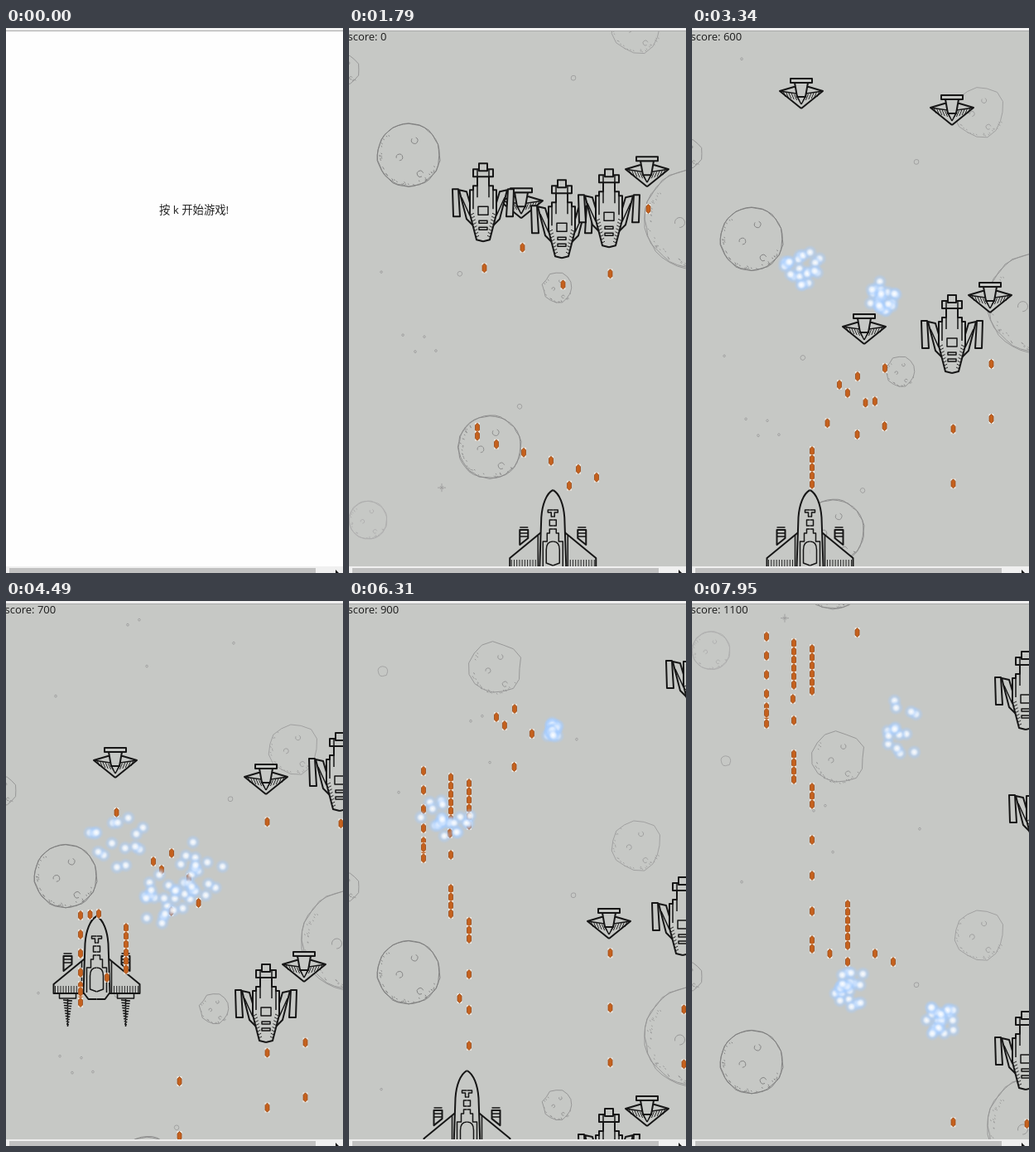
An HTML page with a canvas for the animation above (8 s loop, 407 px wide and 657 px high).

```html
<!DOCTYPE html>
<html lang="zh">
<head>
<meta charset="utf-8">
<style>
html, body { margin: 0; height: 100%; overflow: hidden; background: #fff; }
canvas { display: block; width: 407px; height: 657px; }
</style>
</head>
<body>
<canvas id="stage" width="407" height="657"></canvas>
<script>
const ctx = document.getElementById('stage').getContext('2d');
const LOOP = 8000, STEP = 140, SKY = '#c6c8c5', INK = '#161616';
const FONT = '"Open Sans", "Noto Sans CJK SC", "Noto Sans CJK", sans-serif';

// Game time is counted in units of one pixel of enemy movement.
const START = -79, CRASH = 630, END = 658;
const SHIP_SPEED = 3.3, BULLET_SPEED = 5 / 3, RELOAD = 10, ENEMY_RELOAD = 99, FIRST_SHOT = 95;

// [time in ms, game time]
const CLOCK = [[400, START], [1210, 0], [2490, 122], [3340, 206], [4490, 322], [6310, 496], [7950, END]];

// [game time, x and y the ship heads for]
const ORDERS = [[START, 155, 557], [-8, 178, 557], [-1, 299, 557], [39, 178, 557], [86, 254, 557],
  [122.5, 145, 557], [212, 90, 557], [252, 90, 391], [305.5, 112, 391], [313, 112, 380], [323, 123, 380],
  [379, 123, 444], [430, 145, 444], [459, 145, 568], [512.5, 188, 564], [529, 188, 464], [609, 243, 464]];

// Outlines hold the right half only and are mirrored; hatch: [x0, y0, x1, y1, dx, dy, count]
const SMALL = {
  halfWidth: 26, halfHeight: 18, reach: 31, muzzle: 26, lives: 1, points: 100,
  parts: ['M0 18L26-3L9-8H0', 'M0-13H8L5 4H0', 'M0-18H13V-13H0'],
  detail: 'M26-3L6 0M5 4L0 13',
  hatch: [22, -3, 5, 2, -3, 7, 6]
};
const BIG = {
  halfWidth: 38, halfHeight: 47, reach: 38, muzzle: 49, lives: 3, points: 300,
  parts: ['M29-15L20-13L12 14V28L20 20Z', 'M37-16H30L28 17H36Z',
    'M0-32H7V-20H12V-15H16V14L8 45L0 47', 'M0-40H12V-31H0', 'M0-47H5V-38H0'],
  detail: 'M0 5H6V15H0M0 22H5V25H0M0 30H5V33H0M12-15V8M7-20V-6M7-40V-31M26-6L16 16',
  hatch: [15, 15, 9, 42, -4, -2, 8]
};
const SHIP = {
  halfWidth: 52, parts: ['M40 66V48H30V58Z', 'M13 50L52 82V93H13Z', 'M0 0C8 4 13 18 14 33L16 92L10 100H0'],
  detail: 'M0 24H6V27H2V32H0M0 36H4V43H0M0 47H4V52H7V62H12V92M0 62Q8 62 8 72V88L0 91' +
    'M30 52H40M30 56H40M30 45H40M25 94V99H45V94M18 54V92',
  hatch: [21, 84, 50, 84, 0, 8, 10]
};

const ENEMIES = [[SMALL, 208, 157, -82], [BIG, 162, 156, -86], [BIG, 257, 176, -86], [BIG, 314, 163, -86],
  [SMALL, 360, 119, -69], [SMALL, 132, -127, 176], [SMALL, 314, -107, 189], [BIG, 403, -116, 207],
  [SMALL, 263, -322, 402], [BIG, 420, -408, 478], [BIG, 403, -550, 640]
].map(([kind, x, y, from]) => ({ kind, x, y, from, lives: kind.lives, end: Infinity }));

// Scenery: x, y, radius, grey level
const MOONS = [[72, 117, 38, 125], [170, 469, 38, 138], [417, 194, 60, 148], [23, 557, 23, 174]];
const ASTEROIDS = [[252, 277, 18, 145], [-4, 14, 17, 145], [347, -36, 30, 156], [177, -249, 31, 146], [41, -246, 6, 160]];
const PEBBLES = [[271, 24], [134, 260], [206, 420], [39, 258], [65, 334], [91, 336], [80, 354], [105, 353],
  [60, -100], [161, -192], [147, -186], [275, -164], [170, -136]];
const SCENERY_HEIGHT = 936;

function seeded(seed) {
  return () => {
    seed = (seed * 16807) % 2147483647;
    return seed / 2147483647;
  };
}

function gameTime(ms) {
  for (let i = 1; i < CLOCK.length; i++) {
    const [m0, d0] = CLOCK[i - 1], [m1, d1] = CLOCK[i];
    const steps = Math.round((m1 - m0) / STEP);
    if (ms < m1) return d0 + (d1 - d0) * Math.floor((ms - m0) / (m1 - m0) * steps + 1e-6) / steps;
  }
  return END;
}

const approach = (from, to, reach) => from + Math.max(-reach, Math.min(reach, to - from));

function noseAt(d) {
  let [, x, y] = ORDERS[0];
  ORDERS.forEach(([at, toX, toY], i) => {
    const until = Math.min(d, i + 1 < ORDERS.length ? ORDERS[i + 1][0] : d);
    const reach = Math.max(0, until - at) * SHIP_SPEED;
    x = approach(x, toX, reach);
    y = approach(y, toY, reach);
  });
  return { x, y };
}

const enemyY = (e, d) => e.y + d;
const bulletY = (b, d) => b.y + b.speed * (d - b.at);
const alive = (o, d) => d >= (o.at ?? o.from) && d < o.end;

// Plays the game once and notes when each bullet and enemy is lost.
function simulate() {
  const shots = [], bullets = [];
  for (let at = -21; at < CRASH; at += RELOAD) {
    shots.push({ ...noseAt(at), at, speed: -1, end: Infinity });
  }
  for (const e of ENEMIES) {
    for (let at = e.from + FIRST_SHOT; at < END; at += ENEMY_RELOAD) {
      bullets.push({ x: e.x + 1.5, y: enemyY(e, at) + e.kind.muzzle, at, speed: BULLET_SPEED, owner: e, end: Infinity });
    }
  }
  for (let d = START; d <= END; d += 2) {
    const ship = noseAt(d);
    const flying = bullets.filter(b => alive(b, d) && b.at < b.owner.end);
    const foes = ENEMIES.filter(e => alive(e, d));
    for (const b of flying) {
      const depth = bulletY(b, d) - ship.y;
      if (d < CRASH && Math.abs(b.x - ship.x) < 14 && depth > 20 && depth < 100) b.end = d;
    }
    for (const s of shots.filter(s => alive(s, d))) {
      const y = bulletY(s, d);
      const clash = flying.find(b => b.end > d && Math.abs(b.x - s.x) < 7 && Math.abs(bulletY(b, d) - y) < 6);
      const foe = foes.find(e => Math.abs(e.x - s.x) < e.kind.reach &&
        Math.abs(enemyY(e, d) - y) <= e.kind.halfHeight);
      if (clash) clash.end = s.end = d;
      if (foe) {
        s.end = d;
        if (--foe.lives <= 0) foe.end = d;
      }
    }
    if (d + 2 > CRASH) {
      const rammed = foes.find(e => Math.abs(e.x - ship.x) < 75 && Math.abs(enemyY(e, d) - ship.y - 50) < 50);
      if (rammed) rammed.end = CRASH;
    }
  }
  return [...shots, ...bullets.filter(b => b.at < b.owner.end)];
}

const BULLETS = simulate();
const wreck = noseAt(CRASH);
const BLASTS = ENEMIES.filter(e => e.end < END).map(({ kind, x, y, end }) =>
  ({ at: end, x: x - kind.halfWidth + 9, y: y + end - kind.halfHeight + 1, points: kind.points }));
BLASTS.push({ at: CRASH, x: wreck.x - SHIP.halfWidth, y: wreck.y + 2, points: 100 });

function drawAt(x, y, draw) {
  ctx.save();
  ctx.translate(x, y);
  draw();
  ctx.restore();
}

function outline(x, y, r, jag, points, rnd) {
  ctx.beginPath();
  for (let i = 0; i < points; i++) {
    const a = i / points * Math.PI * 2, q = r * (1 + (rnd() * 2 - 1) * jag);
    ctx.lineTo(x + q * Math.cos(a), y + q * Math.sin(a));
  }
  ctx.closePath();
  ctx.stroke();
}

function drawRock([x, y, r, grey], jag, points, seed) {
  const rnd = seeded(seed * 977 + 41);
  ctx.strokeStyle = `rgb(${grey},${grey},${grey})`;
  ctx.lineWidth = .9;
  outline(x, y, r, jag, points, rnd);
  if (r < 15) return;
  if (jag < .05) outline(x, y, r - .5, jag, points, rnd);
  for (let i = 0; i < 3; i++) {
    const a = 2.9 + i * 2.2, q = r * (.3 + .2 * i);
    ctx.beginPath();
    ctx.arc(x + q * Math.cos(a), y + q * Math.sin(a), r * .1, a, a + 5);
    ctx.stroke();
  }
  ctx.beginPath();
  for (let i = 0; i < r; i++) {
    const a = .4 + rnd() * 3.6, q = r * (.86 + rnd() * .1);
    const px = x + q * Math.cos(a), py = y + q * Math.sin(a);
    ctx.moveTo(px, py);
    ctx.lineTo(px + 1.5, py + 1);
  }
  ctx.stroke();
}

function drawScenery(shift) {
  for (const top of [shift, shift - SCENERY_HEIGHT]) {
    drawAt(0, top, () => {
      MOONS.forEach((m, i) => drawRock(m, .02, 36, i + 1));
      ASTEROIDS.forEach((a, i) => drawRock(a, .08, 15, i + 9));
      PEBBLES.forEach(([x, y], i) => drawRock([x, y, i < 3 ? 3 : 1.4, 158], .1, 8, i + 20));
      ctx.stroke(new Path2D('M107 518H117M112 513V523M110 516l4 4M114 516l-4 4'));
    });
  }
}

function drawCraft({ parts, detail, hatch: [x0, y0, x1, y1, dx, dy, count] }) {
  ctx.strokeStyle = INK;
  ctx.fillStyle = SKY;
  for (const side of [-1, 1]) {
    ctx.save();
    ctx.scale(side, 1);
    ctx.lineWidth = 2;
    for (const part of parts) {
      const path = new Path2D(part);
      ctx.fill(path);
      ctx.stroke(path);
    }
    ctx.lineWidth = 1.5;
    ctx.stroke(new Path2D(detail));
    ctx.lineWidth = .9;
    ctx.beginPath();
    for (let i = 0; i < count; i++) {
      const k = i / (count - 1), x = x0 + (x1 - x0) * k, y = y0 + (y1 - y0) * k;
      ctx.moveTo(x, y);
      ctx.lineTo(x + dx, y + dy);
    }
    ctx.stroke();
    ctx.restore();
  }
}

function drawFlames() {
  ctx.lineWidth = 1.5;
  ctx.beginPath();
  for (const x of [-35, 35]) {
    for (let i = 0; i < 10; i++) {
      const half = 5.5 * (1 - i / 12), y = 101 + i * 3.2;
      ctx.moveTo(x - half, y);
      ctx.lineTo(x + half, y + 1);
    }
    ctx.moveTo(x, 100);
    ctx.lineTo(x, 133);
  }
  ctx.stroke();
}

function drawBullet() {
  ctx.fillStyle = 'rgba(250,240,230,.75)';
  ctx.fillRect(-3, -6, 6, 12);
  ctx.fillStyle = '#c5611d';
  ctx.strokeStyle = '#94481a';
  ctx.lineWidth = .8;
  const shape = new Path2D('M0-5.5L2.5-3V3L0 5.5L-2.5 3V-3Z');
  ctx.fill(shape);
  ctx.stroke(shape);
}

function drawSpark() {
  const glow = ctx.createRadialGradient(0, 0, 0, 0, 0, 9);
  glow.addColorStop(0, 'rgba(255,255,255,.95)');
  glow.addColorStop(.3, 'rgba(232,242,255,.85)');
  glow.addColorStop(.6, 'rgba(170,207,255,.45)');
  glow.addColorStop(1, 'rgba(160,200,255,0)');
  ctx.fillStyle = glow;
  ctx.fillRect(-9, -9, 18, 18);
}

function drawBlast({ at, x, y }, d, seed) {
  const age = d - at, rnd = seeded(seed * 7919 + 137);
  if (age < 0) return;
  const spread = 9.5 * Math.pow(age, .27);
  for (let i = 0; i < 22; i++) {
    const a = rnd() * Math.PI * 2, q = spread * Math.pow(rnd(), .75), life = 110 + 130 * rnd();
    if (age < life) drawAt(x + q * Math.cos(a), y + q * Math.sin(a), drawSpark);
  }
}

function drawGame(d) {
  ctx.fillStyle = SKY;
  ctx.fillRect(0, 4, 407, 645);
  drawScenery(d * 2 / 3);
  if (d < CRASH) {
    const { x, y } = noseAt(d);
    drawAt(x - 2.5, y, () => {
      drawCraft(SHIP);
      drawFlames();
    });
  }
  for (const e of ENEMIES) {
    if (alive(e, d)) drawAt(e.x, enemyY(e, d), () => drawCraft(e.kind));
  }
  for (const b of BULLETS) {
    if (alive(b, d)) drawAt(b.x, bulletY(b, d), drawBullet);
  }
  BLASTS.forEach((b, i) => drawBlast(b, d, i + 1));
  const score = BLASTS.reduce((sum, b) => sum + (b.at <= d ? b.points : 0), 0);
  ctx.fillStyle = '#1c1c1c';
  ctx.font = '13px ' + FONT;
  ctx.fillText('score: ' + score, -1.5, 15);
}

function drawWindow() {
  ctx.fillStyle = '#f0f0f0';
  ctx.fillRect(0, 0, 407, 3);
  ctx.fillRect(0, 649, 407, 8);
  ctx.fillStyle = '#a9a9a9';
  ctx.fillRect(0, 3, 407, 1);
  ctx.fillStyle = '#c1c1c1';
  ctx.fillRect(4, 651, 370, 6);
  ctx.fillStyle = '#111';
  ctx.fill(new Path2D('M398 653L402 657H398Z'));
}

function render(ms) {
  ctx.fillStyle = '#fefefe';
  ctx.fillRect(0, 0, 407, 657);
  ctx.save();
  ctx.beginPath();
  ctx.rect(0, 4, 407, 645);
  ctx.clip();
  if (ms < CLOCK[0][0]) {
    ctx.fillStyle = '#222';
    ctx.font = '13.33px ' + FONT;
    ctx.fillText('按 k 开始游戏!', 185, 224);
  } else {
    drawGame(gameTime(ms));
  }
  ctx.restore();
  drawWindow();
}

ctx.lineJoin = 'round';
const begin = performance.now();
function tick() {
  render((performance.now() - begin) % LOOP);
  requestAnimationFrame(tick);
}
tick();
</script>
</body>
</html>
```
